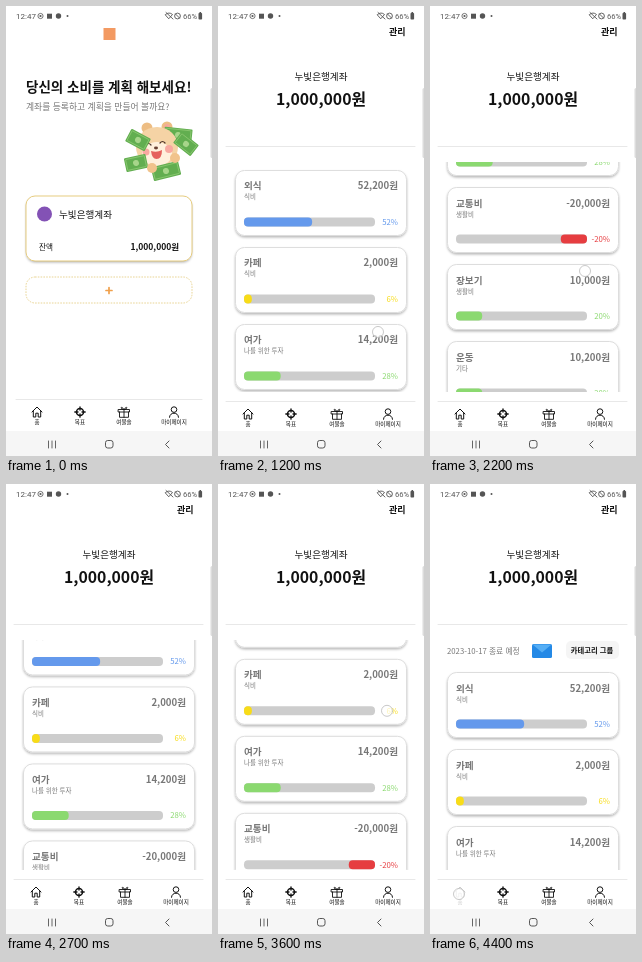
Animation of 206x450 px, one loop 4500 ms. Source, as an HTML page:

```html
<!DOCTYPE html>
<html lang="ko">
<head>
<meta charset="utf-8">
<style>
html, body { margin: 0; width: 100%; height: 100%; overflow: hidden; background: #fff; }
svg { display: block; width: 100%; height: 100%; }
text { font-family: "Noto Sans CJK KR", "Noto Sans CJK", sans-serif; }
.sys { font-family: Roboto, sans-serif; }
</style>
</head>
<body>
<svg id="stage" viewBox="0 0 206 450"></svg>
<script>
const LOOP = 4500;
const BANK = '누빛은행계좌';

const text = (x, y, size, str, o = {}) =>
  `<text x="${x}" y="${y}" font-size="${size}" font-weight="${o.w || 400}" fill="${o.c || '#111'}"` +
  ` text-anchor="${o.a || 'start'}" class="${o.k || ''}">${str}</text>`;
const rect = (x, y, w, h, r, fill, more = '') =>
  `<rect x="${x}" y="${y}" width="${w}" height="${h}" rx="${r}" fill="${fill}" ${more}/>`;
const circle = (x, y, r, fill, more = '') =>
  `<circle cx="${x}" cy="${y}" r="${r}" fill="${fill}" ${more}/>`;
const path = (d, stroke, w = 1, more = '') =>
  `<path d="${d}" fill="none" stroke="${stroke}" stroke-width="${w}" stroke-linecap="round" stroke-linejoin="round" ${more}/>`;
const at = (x, y, body, rot = 0) => `<g transform="translate(${x} ${y}) rotate(${rot})">${body}</g>`;

const icons = [
  path('M-5 0L0-5L5 0M-3.7-1V5H-1.2V1.2H1.2V5H3.7V-1', '#111'),
  circle(0, 0, 3.5, 'none', 'stroke="#111" stroke-width="1.5"') +
    path('M0-5.2V-2M0 5.2V2M-5.2 0H-2M5.2 0H2', '#111', 1.3),
  path('M-5.5-2.5H5.5V0H-5.5ZM-4.5 0V5.3H4.5V0M0-2.5V5.3M0-2.5C-5-3-3-7 0-2.5C3-7 5-3 0-2.5', '#111', .9),
  circle(0, -2.4, 2.8, 'none', 'stroke="#111"') + path('M-4.5 5.3C-4.5-.3 4.5-.3 4.5 5.3', '#111')
];
const labels = ['홈', '목표', '여물솔', '마이페이지'];

function tabs(xs, y, left, right, id) {
  return path(`M${left} ${y - 12.5}H${right}`, '#e2e2e2', .8) + xs.map((x, i) =>
    `<g id="${id}${i}">` + at(x, y, icons[i]) +
    text(x, y + 12, 5.6, labels[i], { a: 'middle', w: 500 }) + '</g>').join('');
}

const bill = (x, y, rot, w = 22, h = 13) => at(x, y,
  rect(-w / 2, -h / 2, w, h, 1, '#62ae50') +
  rect(-w / 2 + 1.5, -h / 2 + 1.5, w - 3, h - 3, .5, 'none', 'stroke="#94cd78" stroke-width=".7"') +
  circle(0, 0, 3, '#a7d58a'), rot);

const mascot =
  circle(141, 122, 5.5, '#edbd83') + circle(161, 121, 5.5, '#edbd83') + circle(161, 121, 3, '#f7a99a') +
  bill(172, 129, 6, 28, 14) +
  '<ellipse cx="151" cy="141" rx="21" ry="20" fill="#f5d3a5"/>' +
  '<ellipse cx="151" cy="148" rx="15" ry="12" fill="#fff0dc"/>' +
  circle(140, 146, 3.5, '#f8a9a0') + circle(163, 143, 4, '#f8a9a0') +
  path('M140 139q2.500-3 5 0M154 137q2.500-3 5 0', '#4b342b', 1.2) +
  '<ellipse cx="150" cy="142" rx="2" ry="1.4" fill="#6a4133"/>' +
  '<path d="M145 145Q151 147 156 144Q156 153 150.500 153Q146 153 145 145Z" fill="#e5625d"/>' +
  bill(132, 134, 28, 22, 14) + bill(180, 138, 38, 22, 14) + bill(130, 157, -12, 22, 14) +
  bill(160, 165, -14, 28, 14) + circle(146, 162, 5, '#f1c38c') + circle(169, 152, 5, '#f1c38c');

const home =
  rect(0, 0, 206, 425, 0, '#fff') +
  rect(97.500, 22, 12, 12, 0, '#f39a62') +
  text(20, 86, 13.5, '당신의 소비를 계획 해보세요!', { w: 700 }) +
  text(20, 104, 8.8, '계좌를 등록하고 계획을 만들어 볼까요?', { c: '#777' }) +
  mascot +
  rect(20, 190, 166, 65, 9, '#e6e6e6', 'filter="url(#shade)"') +
  '<g id="account">' +
    rect(20, 190, 166, 65, 9, '#fff', 'stroke="#e5c873" stroke-width=".9"') +
    circle(38.500, 208, 7.5, '#8352b5') +
    text(53, 212, 9.6, BANK, { w: 500 }) +
    text(33, 244, 7.6, '잔액', { w: 500 }) +
    text(173, 244, 8.5, '1,000,000원', { a: 'end', w: 700 }) +
  '</g>' +
  rect(20, 271, 166, 26, 9, '#fff', 'stroke="#e4cb7c" stroke-width=".8" stroke-dasharray="1.6 1.2"') +
  path('M100 284.500H106M103 281.500V287.500', '#f0a04b', 1.7) +
  tabs([31, 74, 118, 168], 406, 10, 196, 'h');

const GREEN = '#8bd970';
const items = [
  ['외식', '식비', '52,200원', 52, '#6499ec'],
  ['카페', '식비', '2,000원', 6, '#f8dc18'],
  ['여가', '나를 위한 투자', '14,200원', 28, GREEN],
  ['교통비', '생활비', '-20,000원', -20, '#e63d40'],
  ['장보기', '생활비', '10,000원', 20, GREEN],
  ['운동', '기타', '10,200원', 20, GREEN]
];

function card([name, group, sum, pct, color], i) {
  const w = 131 * Math.abs(pct) / 100;
  return at(0, 188 + 77 * i,
    rect(17.500, .5, 171, 65, 9, '#fff', 'stroke="#ddd" filter="url(#shade)"') +
    text(26, 19.5, 9.6, name, { w: 700, c: '#777' }) +
    text(26, 29.5, 6.5, group, { c: '#777' }) +
    text(180, 19.5, 9.6, sum, { w: 700, c: '#777', a: 'end' }) +
    rect(26, 47.5, 131, 9, 4, '#cdcdcd') +
    rect(pct < 0 ? 157 - w : 26, 47.5, w, 9, 4, color) +
    text(180, 55, 7.8, pct + '%', { c: color, a: 'end' }));
}

const detail =
  rect(0, 0, 206, 425, 0, '#fff') +
  text(187.500, 28.500, 9, '관리', { w: 700, a: 'end' }) +
  text(103, 74, 9.6, BANK, { a: 'middle', w: 500 }) +
  text(103, 99, 15.8, '1,000,000원', { a: 'middle', w: 700 }) +
  path('M8 140.500H197', '#e2e2e2', .8) +
  '<g clip-path="url(#list)"><g id="scroll">' +
    text(17, 170, 7.75, '2023-10-17 종료 예정', { c: '#777' }) +
    rect(102, 160, 20, 14, 1.5, '#2489e6') +
    '<path d="M102.500 160.500H121.500L112 168.500Z" fill="#55aef5"/>' +
    rect(136, 157, 53, 18, 5, '#f5f5f5') +
    text(162, 169, 7.3, '카테고리 그룹', { a: 'middle', w: 600 }) +
    items.map(card).join('') +
  '</g></g>' +
  tabs([30, 73, 119, 170], 408, 8, 197, 'd');

const GREY = '#555';
const system =
  rect(0, 0, 206, 18, 0, '#fff') +
  text(10, 13, 8, '12:47', { c: GREY, k: 'sys' }) +
  circle(34.500, 10, 2.6, 'none', `stroke="${GREY}" stroke-width=".8"`) + circle(34.500, 10, 1.1, GREY) +
  rect(41, 7.7, 5, 5, 0, GREY) + circle(52.500, 10, 2.7, GREY) + circle(61.500, 10, 1, GREY) +
  path('M159.500 8.500q3.500-3 7 0L163 12.500ZM160 6.500L167 13', GREY, .9) +
  circle(171.500, 10, 2.9, 'none', `stroke="${GREY}" stroke-width=".9"`) + path('M169.500 8L173.500 12', GREY, .9) +
  text(177, 13, 7.6, '66%', { c: GREY, k: 'sys' }) +
  rect(192.500, 7, 3.6, 6.5, .8, GREY) + rect(193.500, 6, 1.6, 1.5, 0, GREY) +
  rect(0, 425, 206, 25, 0, '#f6f6f6') +
  path('M42.500 435V442M46 435V442M49.500 435V442', GREY, .9) +
  rect(99.500, 434.500, 7.5, 7.5, 2.2, 'none', `stroke="${GREY}"`) +
  path('M163 435L159.500 438.500L163 442', GREY) +
  rect(204.500, 82, 4, 70, 1.5, '#dcdcdc');

const $ = id => document.getElementById(id);
$('stage').innerHTML =
  '<defs><filter id="shade" x="-10%" y="-10%" width="120%" height="130%">' +
  '<feDropShadow dx="0" dy="1.6" stdDeviation=".9" flood-color="#000" flood-opacity=".27"/></filter>' +
  '<clipPath id="list"><rect x="8" y="156" width="190" height="230"/></clipPath></defs>' +
  rect(0, 0, 206, 450, 0, '#fafafa') +
  `<g id="home">${home}</g><g id="detail">${detail}</g>` + system +
  circle(0, 0, 5.5, '#fff', 'id="touch" fill-opacity=".7" stroke="#bbb" stroke-width=".8"');

function track(keys, t) {
  const i = keys.findIndex(k => k[0] > t);
  if (i === 0) return keys[0][1];
  if (i < 0) return keys[keys.length - 1][1];
  const [a, v] = keys[i - 1], [b, u] = keys[i];
  return v + (u - v) * (t - a) / (b - a);
}

const scrollKeys = [[1150, 0], [1500, 165], [1700, 226], [2000, 238], [2220, 238], [2550, 110],
  [2900, 0], [3250, 0], [3600, 90], [3780, 125], [3880, 125], [4200, 0]];
const pressKeys = [[400, 1], [550, .4]];
const homeZoom = [[550, 1], [700, 1.036], [900, 1.09]];
const homeFade = [[550, 1], [700, .72], [850, .3]];
const detailZoom = [[700, .94], [1000, 1]];
const detailFade = [[700, 0], [900, 1]];

// start, end, x and y of the finger for a given scroll
const touches = [
  [380, 520, 120, () => 222],
  [1120, 1480, 160, s => 350 - s],
  [2150, 2520, 155, s => 503 - s],
  [3220, 3680, 169, s => 317 - s],
  [3860, 4080, 165, s => 340 - s],
  [4340, 4500, 29, () => 410]
];

const zoom = s => `translate(103 225) scale(${s}) translate(-103 -225)`;

function draw(t) {
  const s = track(scrollKeys, t);
  $('home').setAttribute('transform', zoom(track(homeZoom, t)));
  $('home').setAttribute('opacity', track(homeFade, t));
  $('account').setAttribute('opacity', track(pressKeys, t));
  $('detail').setAttribute('transform', zoom(track(detailZoom, t)));
  $('detail').setAttribute('opacity', track(detailFade, t));
  $('scroll').setAttribute('transform', `translate(0 ${-s})`);
  $('d0').setAttribute('opacity', track([[4320, 1], [4400, .2]], t));
  const hit = touches.find(k => t >= k[0] && t < k[1]);
  $('touch').setAttribute('visibility', hit ? 'visible' : 'hidden');
  if (hit) $('touch').setAttribute('transform', `translate(${hit[2]} ${hit[3](s)})`);
}

const start = performance.now();
function tick() {
  draw((performance.now() - start) % LOOP);
  requestAnimationFrame(tick);
}
tick();
</script>
</body>
</html>
```
